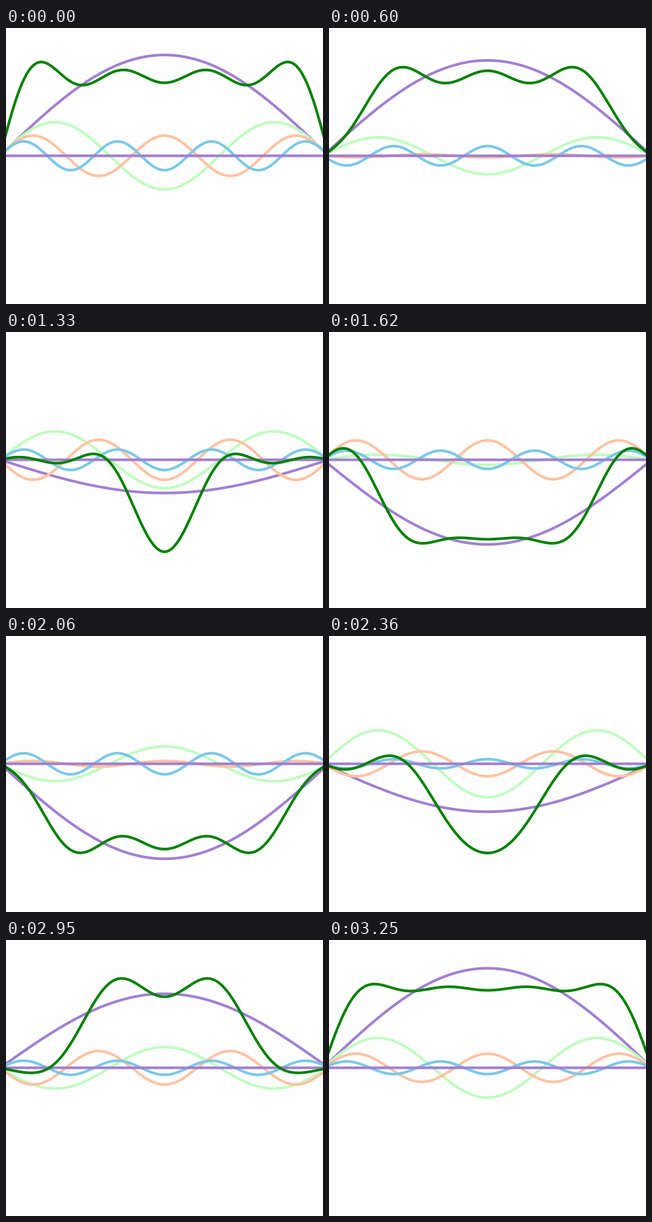
A matplotlib script that plays this animation: 452x392 px, repeating every 3350 ms.

```python
import numpy as np
import matplotlib.pyplot as plt
from matplotlib.animation import FuncAnimation

W, H, DPI = 452, 392, 64       # a power of two keeps the pixel size exact
LOOP, TICK = 3350, 10          # ms
BASE, AMP = 181.5, 143.2       # rest line and height of the fundamental
CENTER, LENGTH = 226, 468.6    # string middle and distance between its ends
STEP = np.radians(2.101)       # phase advance per unit
LINE = 3.75 * 72 / DPI

PURPLE = "#a17fd0"
MODES = {1: PURPLE, 3: "#c0fcc0", 5: "#ffc2a2", 7: "#7bc8e8"}

# The picture is held between these times; phases are in units of STEP.
TIMES = [0, 600, 740, 890, 1040, 1180, 1330, 1470, 1620, 1760,
         1910, 2060, 2210, 2360, 2500, 2650, 2800, 2950, 3100, 3250]
PHASES = [0, 9, 16, 24, 31, 41, 52, 59.5, 70, 79,
          87, 95, 106, 115, 124, 132, 143, 151, 160, 167]

x = np.linspace(-4, W + 4, 307)
angle = np.pi * ((x - CENTER) / LENGTH + 0.5)
shapes = {n: AMP / n * np.sin(n * angle) for n in MODES}

fig = plt.figure(figsize=(W / DPI, H / DPI), dpi=DPI, facecolor="#fefefe")
ax = fig.add_axes([0, 0, 1, 1])
ax.set_xlim(0, W)
ax.set_ylim(H, 0)
ax.axis("off")


def add_line(color, z):
    line, = ax.plot(x, np.full_like(x, BASE), color=color, lw=LINE, zorder=z)
    line.set_snap(False)
    return line


waves = {n: add_line(color, 2 + n / 10) for n, color in MODES.items()}
axis_line = add_line(PURPLE, 3)
total = add_line("#008000", 4)


def update(i):
    k = np.searchsorted(TIMES, i * TICK, side="right") - 1
    phase = PHASES[k] * STEP
    height = np.zeros_like(x)
    for n, line in waves.items():
        y = shapes[n] * np.cos(n * phase)
        line.set_ydata(BASE - y)
        height += y
    total.set_ydata(BASE - height)
    return [*waves.values(), axis_line, total]


anim = FuncAnimation(fig, update, frames=LOOP // TICK, interval=TICK,
                     repeat=True, repeat_delay=0, blit=False)
plt.show()
```
